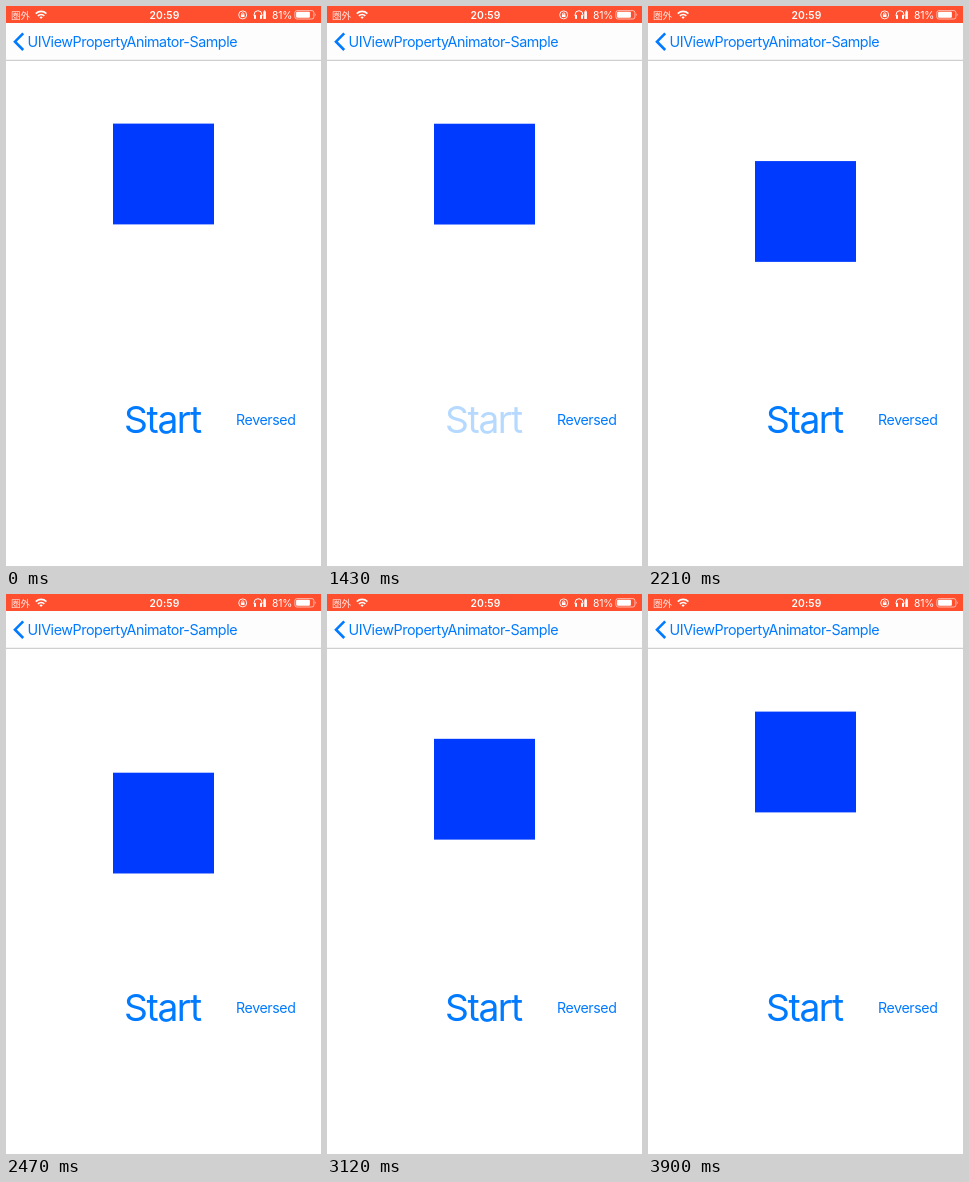
Write an HTML page that moves like this. It is 315 px wide and 560 px high and loops after 4420 ms.

```html
<!DOCTYPE html>
<html lang="en">
<head>
<meta charset="utf-8">
<title>Property animator</title>
<style>
  html, body { margin: 0; height: 100%; overflow: hidden; background: #fff; }
  svg { display: block; width: 100%; height: 100%; font-family: Inter, "Noto Sans CJK JP", "Noto Sans CJK", sans-serif; }
  .blue { fill: #007aff; }
  .status { fill: #fff; font-size: 10.3px; }
  .line { fill: none; stroke: #fff; }
</style>
</head>
<body>
<svg viewBox="0 0 315 560">
  <rect width="315" height="560" fill="#fff"/>
  <rect y="17" width="315" height="37" fill="#fdfdfd"/>
  <rect y="53.8" width="315" height="1" fill="#c4c4c6"/>
  <rect width="315" height="17" fill="#ff4f2e"/>

  <g class="status">
    <text x="5" y="12.6" opacity=".85" style="font-size:9.6px">圏外</text>
    <text x="158.5" y="12.7" text-anchor="middle" font-weight="600" letter-spacing=".15">20:59</text>
    <text x="266" y="12.7" letter-spacing="-.1">81%</text>
  </g>

  <!-- Wi-Fi -->
  <g class="line" stroke-width="1.7">
    <path d="M29.8 7.6a7.6 7.6 0 0 1 10.6 0M31.9 9.8a4.6 4.6 0 0 1 6.4 0"/>
    <path d="M33.5 11.2a2.3 2.3 0 0 1 3.2 0L35.1 13z" fill="#fff" stroke="none"/>
  </g>

  <!-- Rotation lock -->
  <g class="line" stroke-width=".9">
    <circle cx="236.7" cy="8.9" r="4"/>
    <path d="M235.6 8.5v-.6a1.1 1.1 0 0 1 2.2 0v.6"/>
    <rect x="234.9" y="8.4" width="3.6" height="2.6" fill="#fff" stroke="none"/>
  </g>

  <!-- Headphones and their charge -->
  <path class="line" d="M248.1 10V8.6a3.9 3.9 0 0 1 7.8 0V10"/>
  <g fill="#fff">
    <rect x="248" y="8.8" width="2" height="4.2" rx=".8"/>
    <rect x="254" y="8.8" width="2" height="4.2" rx=".8"/>
    <rect x="257.3" y="5.2" width="2.6" height="7.8" rx=".6"/>
    <rect x="258" y="4.4" width="1.2" height="1"/>
  </g>

  <!-- Battery -->
  <rect class="line" x="288.9" y="4.6" width="19" height="8.4" rx="2" stroke-width=".8" opacity=".75"/>
  <rect x="290.1" y="5.8" width="13.8" height="6" rx="1" fill="#fff"/>
  <path d="M308.9 7.3q1.6 1.5 0 3z" fill="#fff" opacity=".75"/>

  <path d="M17.2 27.4 9 35.7l8.2 8.3" fill="none" stroke="#007aff" stroke-width="2.6"/>
  <g class="blue" font-weight="420">
    <text x="21.6" y="40.8" font-size="14.3" letter-spacing="-.44">UIViewPropertyAnimator-Sample</text>
    <text id="start" x="156.4" y="427.4" font-size="37.2" letter-spacing="-1.4" text-anchor="middle">Start</text>
    <text id="reversed" x="259.8" y="419" font-size="14.2" letter-spacing="-.4" text-anchor="middle">Reversed</text>
  </g>

  <rect id="box" x="107" y="117.6" width="101" height="100.8" fill="#003aff"/>
</svg>
<script>
const LOOP = 4420, STEP = 130;
const START_TAP = 1400, REVERSE_TAP = 2597.5;
const [box, start, reversed] = ["box", "start", "reversed"].map(id => document.getElementById(id));

// A tapped button dims at once and then fades back in.
function tapOpacity(t, tap) {
  if (t < tap) return 1;
  const p = Math.min(1, (t - tap) / 400);
  return 0.2 + 0.8 * p * Math.sqrt(2 - p);
}

// The box speeds up downwards, then retraces the same path upwards.
function boxOffset(t) {
  const elapsed = Math.min(t, 2 * REVERSE_TAP - t) - START_TAP;
  return 19 * (Math.max(0, elapsed) / 550) ** 1.755;
}

function draw(now) {
  const t = Math.floor((now % LOOP) / STEP) * STEP;
  box.setAttribute("transform", `translate(0 ${boxOffset(t).toFixed(2)})`);
  start.setAttribute("opacity", tapOpacity(t, START_TAP));
  reversed.setAttribute("opacity", tapOpacity(t, REVERSE_TAP));
  requestAnimationFrame(draw);
}
draw(performance.now());
</script>
</body>
</html>
```
